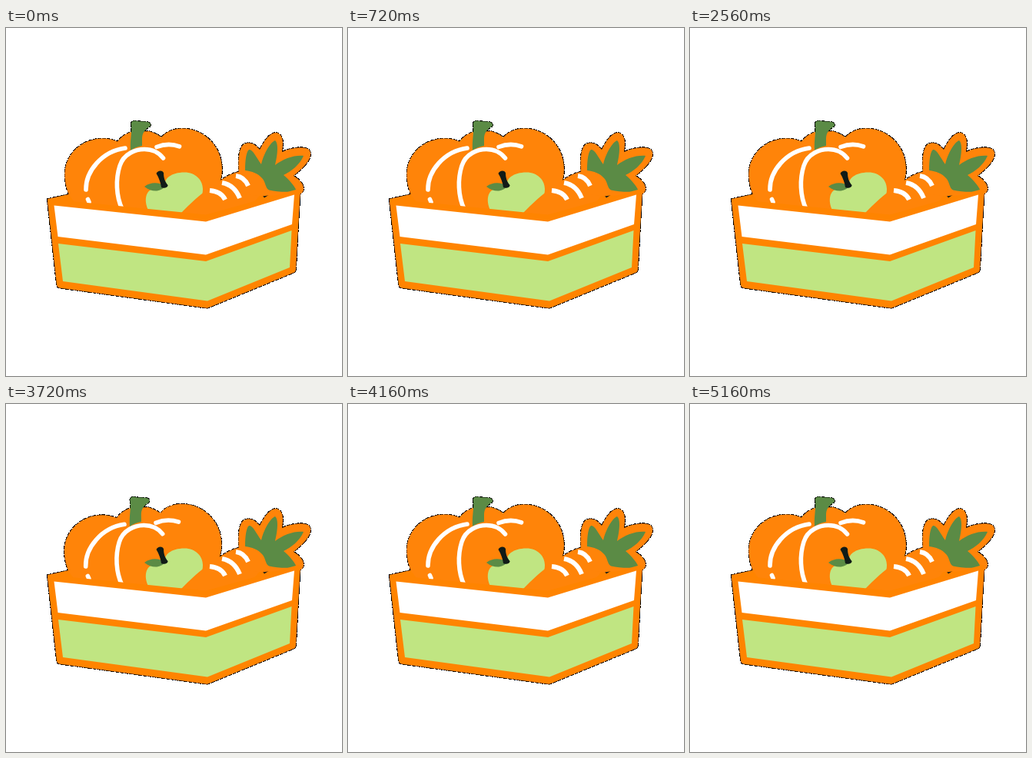
Animation of 437x452 px, one loop 8 s. Source, as an HTML page:

```html
<!DOCTYPE html>
<html lang="en">
<head>
<meta charset="utf-8">
<title>Vegetable crate</title>
<style>
  html, body { margin: 0; width: 100%; height: 100%; overflow: hidden; background: #fff; }
  svg { display: block; width: 100%; height: 100%; }
  .edge { fill: #000; stroke: #000; stroke-width: 1.8; stroke-linejoin: round; stroke-dasharray: 5 1; shape-rendering: crispEdges; }
  .orange { fill: #ff8400; }
  .produce { fill: #ff8409; }
  .green { fill: #5b8b45; }
  .lime { fill: #c0e582; }
  .white { fill: #fff; }
  .dark { fill: #111b17; }
  .stripe { fill: none; stroke: #fff; stroke-width: 5.6; stroke-linecap: round; }
  .carrot .stripe { stroke-linecap: butt; stroke-width: 6; }
</style>
</head>
<body>
<svg id="stage" viewBox="0 0 437 452"></svg>
<script>
const LOOP = 8000, STEP = 40;

const shapes = {
  pumpkin: 'M82 217C78 207 76 197 76.500 188C78 162 100 143.500 126 143.500C133 143.500 139 145 145 147.500C150 141 156 137 163 135L186 134C192 136 197 138 202 142C209 134 219 130.500 229 130.500C258 130.500 281 154 281 183C281 192 279 199 276 206L268 245L100 240Z',
  stem: 'M163 126C162 122 165 120 169 120.500C174 122 178 121 184 122C188 123 189 126 187 128C180 132 177 137 177 144L177 153C171 154 166 156 162 159C161 146 164 136 163 126Z',
  apple: 'M192 246C178 232 180 213 189 210C196 207 203 210 207 204C205 196 215 187.500 232 187.500C247 187.500 256 198 256 209C256 228 240 246 222 250Z',
  appleLeaf: 'M180 206C188 200 198 200 207 205C202 213 190 214 180 206Z',
  appleStem: 'M195.500 189C197 185 203 184 205 188C205 195 207 200 210.500 204C211 207 205 209 202 207C201 200 199 195 195.500 189Z',
  carrot: 'M215 255L228 240C240 228 252 216 265 208C278 198 292 187 308 186C320 184 334 192 336 203C336 215 320 230 300 245Z',
  halo: 'M303 190C302 174 302 158 308 152C314 147 323 149 330 158C335 148 343 135 352 136C361 138 361 150 359 161C369 156 382 154 390 156C398 158 397 166 394 171C389 180 381 186 374 192C381 196 388 203 387 210C386 215 382 216 378 217L341 217.500L334 218.500L300 215Z',
  carrotLeaf: 'M311 185C311 174 312 161 316 158C321 157 326 169 332 177C335 164 343 149 350 146C355 150 353 166 350 178C361 170 374 165 387 166C382 178 371 186 361 191C367 196 375 204 378 212C366 213.500 353 213 342 210.500C337 208 338 200 333 195C328 189 320 186 311 185Z',
  crateBack: 'M54 222L86 215L260 212L340 214L383 210L376 316L261 363L67 336Z',
  crate: 'M56 222L260 242.500L380.500 209Q382.500 209 382.500 212L377 314Q376.500 317 373.500 318L264 363Q262 364 259 363.500L69 337.500Q66.500 337 66 334L54 225Q54 222 56 222Z',
  whitePanel: 'M62.500 230.500L260 251.500L375 216.500L372 255L260 294.500L67.500 271Z',
  limePanel: 'M68 280L260 303L371.500 263L369 311L262 354.500L74 329Z',
};

const path = (name, cls) => `<path class="${cls}" d="${shapes[name]}"/>`;
const stripe = d => `<path class="stripe" d="${d}"/>`;
const group = (cls, ...parts) => `<g class="${cls}">${parts.join('')}</g>`;

const stage = document.getElementById('stage');
stage.innerHTML =
  group('edge',
    group('pumpkin', path('pumpkin', ''), path('stem', '')),
    group('carrot', path('carrot', ''), path('halo', '')),
    path('crateBack', ''), path('crate', '')) +
  path('crateBack', 'orange') +
  group('pumpkin',
    path('pumpkin', 'produce'), path('stem', 'green'),
    stripe('M155 156C125 160 103.500 186 104 210'),
    stripe('M106.500 222.500L108 226'),
    stripe('M151 235C143 218 142.500 196 148 179C153 163 169 157.500 180 157.500C190 157.500 199 162 204.500 169'),
    stripe('M196 154.500C205 151 216 150.500 225.500 153.800')) +
  group('apple',
    path('apple', 'lime'),
    group('leaf', path('appleLeaf', 'green')),
    path('appleStem', 'dark')) +
  '<path class="dark" d="M333 217L343 216L336 220.500Z"/>' +
  group('carrot',
    path('carrot', 'produce'), path('halo', 'produce'), path('carrotLeaf', 'green'),
    stripe('M265 211C275 212 282 216 285 223'),
    stripe('M281 201C292 203 300 211 304 221'),
    stripe('M299 192C307 193 312 198 315 205')) +
  path('crate', 'orange') + path('whitePanel', 'white') + path('limePanel', 'lime');

const wobbles = [
  { part: 'apple', start: 0, length: 720, angle: 5, pivot: '218 236' },
  { part: 'leaf', start: 1960, length: 600, angle: 12, pivot: '207 205' },
  { part: 'pumpkin', start: 3680, length: 480, angle: 3, pivot: '180 235' },
  { part: 'carrot', start: 4680, length: 480, angle: 1.5, pivot: '325 250' },
].map(w => ({ ...w, nodes: stage.querySelectorAll('.' + w.part) }));

// Rest, lean left, lean right, rest: three equal linear legs.
function lean(p) {
  if (p <= 0 || p >= 1) return 0;
  const leg = p * 3;
  return leg < 1 ? -leg : leg < 2 ? 2 * leg - 3 : 3 - leg;
}

function draw(time) {
  const t = Math.floor((time % LOOP) / STEP) * STEP;
  for (const { start, length, angle, pivot, nodes } of wobbles) {
    const turn = angle * lean((t - start) / length);
    nodes.forEach(node => node.setAttribute('transform', `rotate(${turn} ${pivot})`));
  }
}

const origin = performance.now();
function tick() {
  draw(performance.now() - origin);
  requestAnimationFrame(tick);
}
tick();
</script>
</body>
</html>
```
